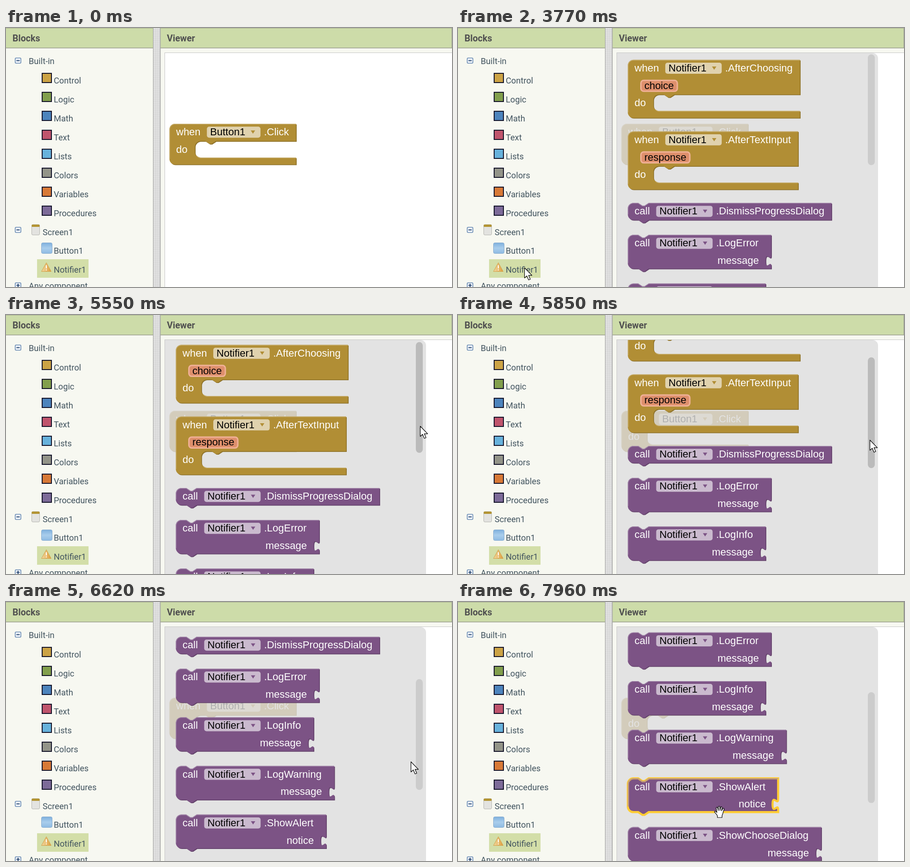
Write an HTML page that moves like this. It is 962 by 560 pixels and loops after 8 s.

```html
<!DOCTYPE html>
<html lang="en">
<head>
<meta charset="utf-8">
<title>Blocks editor</title>
<style>
  html, body { margin: 0; width: 100%; height: 100%; overflow: hidden; background: #f7f8f1; }
  svg { display: block; width: 962px; height: 560px; }
  .head { font: 700 19.6px Roboto, sans-serif; fill: #505050; }
  .tree { font: 18.2px Roboto, sans-serif; fill: #42545f; }
  .block { font: 22px "Liberation Sans", Arial, sans-serif; fill: #fff; }
  .field { fill: #000; }
</style>
</head>
<body>
<svg id="stage" viewBox="0 0 962 560" xmlns="http://www.w3.org/2000/svg"></svg>
<script>
const LOOP = 8000;
const GOLD = { main: '#b18e35', dark: '#8e722a', light: '#c8b072' };
const PLUM = { main: '#7c5385', dark: '#63426a', light: '#a387aa' };

const rect = (x, y, w, h, fill, more = '') =>
  `<rect x="${x}" y="${y}" width="${w}" height="${h}" fill="${fill}" ${more}/>`;
const text = (x, y, str, cls = '', more = '') =>
  `<text x="${x}" y="${y}" class="${cls}" ${more}>${str}</text>`;
const path = (d, more) => `<path d="${d}" ${more}/>`;

// ---- tree on the left ----
const drawers = [
  ['Control', '#cca345'], ['Logic', '#829f4d'], ['Math', '#4d84bd'], ['Text', '#c0546d'],
  ['Lists', '#67b2dc'], ['Colors', '#939489'], ['Variables', '#d87937'], ['Procedures', '#7d6b99']
];

function toggle(y, plus) {
  return rect(19.8, y + .8, 12.4, 11.4, '#eef3fa', 'rx="2.5" stroke="#6d8db4" stroke-width="1.6"') +
    rect(22.5, y + 5.5, 7, 2, '#2c4a73') + (plus ? rect(25, y + 3, 2, 7, '#2c4a73') : '');
}

function tree() {
  const items = drawers.map(([name, color], i) =>
    rect(78, 98 + 41 * i, 20, 20, color, 'stroke="#121228" stroke-width="2"') +
    text(103, 120 + 41 * i, name)).join('');
  return `<g class="tree">
    ${toggle(64)}${text(49, 78, 'Built-in')}${items}
    ${toggle(430)}
    ${rect(55.5, 425, 17, 22.5, '#e3e3e0', 'rx="2.5" stroke="#b5b5b0"')}
    ${rect(55.5, 425, 17, 5, '#b39433', 'rx="1.5"')}
    ${text(79, 448, 'Screen1')}
    ${rect(76.5, 464.5, 23, 23, 'url(#sky)', 'rx="3" stroke="#86abcf"')}
    ${text(103, 488, 'Button1')}
    ${rect(67, 500, 111, 40, '#d3dea8')}
    ${path('M87 507.5L97.5 526.5H76.5Z', 'fill="url(#warn)" stroke="#d1a04c" stroke-linejoin="round"')}
    ${rect(86, 513, 2, 7, '#fff')}${rect(86, 522, 2, 2, '#fff')}
    ${text(103, 529, 'Notifier1')}
    ${toggle(550, true)}${text(49, 564, 'Any component')}
  </g>`;
}

// ---- blocks ----
const NOTCH_IN = 'H22.5l9,6h4.5l9,-6';
const NOTCH_OUT = 'H45l-9,6h-4.5l-9,-6';
const SOCKET = 'V45c0,15 -12,-12 -12,11.25s12,-3.75 12,11.25';

function shell(d, light, c) {
  return path(d, `fill="${c.dark}" class="shade" transform="translate(1.5 1.5)"`) +
    path(d, `fill="${c.main}" class="body"`) +
    path(light, `fill="none" stroke="${c.light}" stroke-width="1.4"`);
}

// Label, dropdown and method name; widths are those of the typeface.
function titleRow(word, wordW, name, nameW, method, c) {
  const x = 14.5 + wordW + 13.7, w = nameW + 39.8;
  return text(14.5, 25.3, word) +
    rect(x, 6.2, w, 24, '#fff', 'rx="5" fill-opacity=".6"') +
    text(x + 7, 25.3, name, 'field') +
    path(`M${x + w - 21},14.5h9.5l-4.75,7z`, `fill="${c.main}"`) +
    text(x + w + 7.5, 25.3, method);
}

function eventBlock(w, name, nameW, method, param, paramW) {
  const m = param ? 75 : 37.5, h = m + 50.5;
  const d = `M0,12a12,12 0 0 1 12,-12H${w}V${m}H100l-9,6h-4.5l-9,-6h-10.5a12,12 0 0 0 -12,12` +
    `v11.5a12,12 0 0 0 12,12H${w}V${h}H12a12,12 0 0 1 -12,-12z`;
  const light = `M.7,${h - 12}V12A11.3,11.3 0 0 1 12,.7H${w}M60,${m + 33}Q63,${m + 36.2} 68,${m + 36.2}H${w}`;
  const pill = param ? rect(28.2, 44.5, paramW + 15, 23.5, '#de8f6c',
    'rx="6" stroke="#f0b196" stroke-width="3"') + text(35.6, 63, param, 'field') : '';
  return shell(d, light, GOLD) + titleRow('when', 52.6, name, nameW, method, GOLD) + pill +
    text(14.5, m + 25.3, 'do');
}

function callBlock(w, method, arg) {
  const h = arg ? 73 : 36.8;
  const d = `M0,12a12,12 0 0 1 12,-12${NOTCH_IN}H${w}${arg ? SOCKET : ''}V${h}${NOTCH_OUT}` +
    'H12a12,12 0 0 1 -12,-12z';
  const light = `M.7,${h - 12}V12A11.3,11.3 0 0 1 12,.7H22.5l9,6h4.5l9,-6H${w}`;
  return shell(d, light, PLUM) + titleRow('call', 33, 'Notifier1', 81.9, method, PLUM) +
    (arg ? text(w - 26.5, 63, arg, '', 'text-anchor="end"') : '');
}

// top, right edge, method, argument or parameter
const LEFT = 366.3;
const drawer = [
  [68.8, 739, '.AfterChoosing', 'choice', 63.6],
  [223.6, 735, '.AfterTextInput', 'response', 90.5],
  [378.2, 807, '.DismissProgressDialog'],
  [447.2, 677, '.LogError', 'message'],
  [552.4, 665, '.LogInfo', 'message'],
  [657.6, 709.5, '.LogWarning', 'message'],
  [762.8, 692, '.ShowAlert', 'notice'],
  [868, 785, '.ShowChooseDialog', 'message']
];

function drawerBlock([top, right, method, arg, paramW]) {
  const w = right - 1.5 - LEFT;
  const art = paramW ? eventBlock(w, 'Notifier1', 81.9, method, arg, paramW) : callBlock(w, method, arg);
  return `<g class="item" transform="translate(${LEFT} ${top})">${art}</g>`;
}

const ARROW = 'M.5,.5V22.5L5.5,18L9.3,26.8L13,25.2L9.2,16.8H16.5Z';
const HAND = 'M7,25V21C5,18 3,15 1,13.5C0,11.5 2.5,10.5 4.5,12.5L6,14L4.5,5C4.3,2.5 7,2 7.7,4.5L9,10V2.5' +
  'C9,0 12,0 12.2,2.5L12.5,10L14,3C14.6,.8 17,1.4 16.8,3.8L16,10.5L18.5,6C19.8,4 22,5 21.2,7.5' +
  'L19,15C18.5,18 17.5,19 17,21V25Z';

const stage = document.getElementById('stage');
stage.innerHTML = `
  <defs>
    <linearGradient id="sky" x2="0" y2="1"><stop stop-color="#7fb0dd"/><stop offset=".5" stop-color="#a9cdec"/><stop offset="1" stop-color="#8fbbe2"/></linearGradient>
    <linearGradient id="warn"><stop stop-color="#f3d9a0"/><stop offset="1" stop-color="#dd9d3c"/></linearGradient>
    <pattern id="weave" width="4" height="4" patternUnits="userSpaceOnUse">
      ${rect(0, 0, 4, 4, '#dcdcdc')}${rect(0, 0, 1, 2, '#e8e8e8')}${rect(2, 2, 1, 2, '#d0d0d0')}
    </pattern>
    <clipPath id="view">${rect(343, 54, 619, 506, '#000')}</clipPath>
  </defs>
  ${rect(0, 0, 962, 560, '#f7f8f1')}
  ${rect(0, 0, 317, 43, '#cddca9')}${rect(333, 0, 629, 43, '#cddca9')}
  ${rect(0, 0, 962, 1, '#a9b38f')}${rect(0, 42.5, 962, 1.5, '#9fa394')}
  ${rect(318, 0, 14, 560, 'url(#weave)')}
  ${rect(317, 0, 1, 560, '#a4a4a4')}${rect(332, 0, 1.5, 560, '#a4a4a4')}${rect(961, 0, 1, 44, '#9fa394')}
  ${text(14, 29, 'Blocks', 'head')}${text(347, 29, 'Viewer', 'head')}
  ${tree()}
  ${rect(342.5, 53.5, 640, 540, '#fff', 'stroke="#c6c6c6"')}
  <g class="block" clip-path="url(#view)">
    <g transform="translate(352.5 207)">${eventBlock(273, 'Button1', 75.8, '.Click')}</g>
    <g id="flyout">
      ${path('M343,54H894a12,12 0 0 1 12,12V560H343Z', 'fill="#ddd" fill-opacity=".8"')}
      <g id="list">${drawer.map(drawerBlock).join('')}</g>
      <rect id="bar" x="884" width="15" height="239.5" rx="7.5"/>
    </g>
  </g>
  <g id="cursor" fill="#fff" stroke="#000" stroke-width="1.2" stroke-linejoin="round">
    ${path(ARROW, 'id="arrow"')}
    <g id="hand" transform="translate(-9.5 -6)">${path(HAND, '')}</g>
  </g>`;

// ---- motion ----
// Stretches in which the picture steps: start, end, steps.
const bursts = [
  [610, 760, 3], [990, 1530, 8], [1680, 1840, 3], [2150, 2150, 1], [2530, 2530, 1],
  [3770, 4230, 7], [4380, 4540, 3], [4690, 5310, 9], [5550, 6320, 11], [6390, 6850, 7],
  [7010, 7170, 3], [7490, 7960, 7]
];
const cursorKeys = [
  [0, -60, 300], [610, 626, 506], [685, 470, 455], [760, 311, 395], [990, 290, 408],
  [1300, 190, 480], [1530, 134, 513], [1680, 133, 515], [1840, 132, 518], [2150, 132, 519],
  [2530, 132, 519], [3770, 143, 518], [4000, 390, 475], [4230, 590, 450], [4380, 800, 430],
  [4460, 936, 289], [4540, 990, 270], [4690, 948, 262], [5310, 893, 240], [5550, 893, 240],
  [5858, 888, 270], [6620, 873, 345], [6850, 869, 366], [7170, 868, 373], [7490, 845, 378],
  [7725, 690, 420], [7960, 562, 447]
];
const scrollKeys = [
  [0, 0], [5310, 0], [5550, 4.2], [5858, 95.2], [6620, 303.2], [6850, 358], [7170, 381.5]
];

function stepTime(t) {
  let out = 0;
  for (const [a, b, n] of bursts) {
    if (t < a) break;
    const dt = n > 1 ? (b - a) / (n - 1) : 1;
    out = a + dt * Math.min(n - 1, Math.floor((t - a) / dt + .15));
  }
  return out;
}

function at(keys, t) {
  const i = keys.findIndex(k => k[0] > t);
  if (i < 0) return keys[keys.length - 1].slice(1);
  const [a, b] = [keys[i - 1], keys[i]];
  const f = (t - a[0]) / (b[0] - a[0]);
  return a.slice(1).map((v, j) => v + (b[j + 1] - v) * f);
}

const el = id => document.getElementById(id);
const flyout = el('flyout'), list = el('list'), bar = el('bar');
const cursor = el('cursor'), arrow = el('arrow'), hand = el('hand');
const items = [...list.querySelectorAll('.item')].map(g => ({
  body: g.querySelector('.body'), shade: g.querySelector('.shade')
}));
const show = (node, on) => node.setAttribute('visibility', on ? 'inherit' : 'hidden');

function draw(time) {
  const t = stepTime(time);
  const [x, y] = at(cursorKeys, t);
  const [scroll] = at(scrollKeys, t);
  const open = t >= 2530;
  const barY = 57 + scroll * .362;

  flyout.style.display = open ? '' : 'none';
  list.setAttribute('transform', `translate(0 ${-scroll})`);
  bar.setAttribute('y', barY);
  const onBar = x >= 884 && x <= 899 && y >= barY && y <= barY + 240;
  bar.setAttribute('fill', onBar ? '#bbb' : '#ccc');

  let over = false;
  drawer.forEach(([top, right, , arg, paramW], i) => {
    const h = paramW ? 126 : arg ? 74 : 38, dy = y - top + scroll;
    const hit = open && x > LEFT && x < right && dy > 0 && dy < h;
    over = over || hit;
    items[i].body.setAttribute('stroke', hit ? '#fc3' : 'none');
    items[i].body.setAttribute('stroke-width', 4.5);
    show(items[i].shade, !hit);
  });
  cursor.setAttribute('transform', `translate(${x} ${y})`);
  show(arrow, !over);
  show(hand, over);
}

function tick() {
  draw(performance.now() % LOOP);
  requestAnimationFrame(tick);
}
tick();
</script>
</body>
</html>
```
